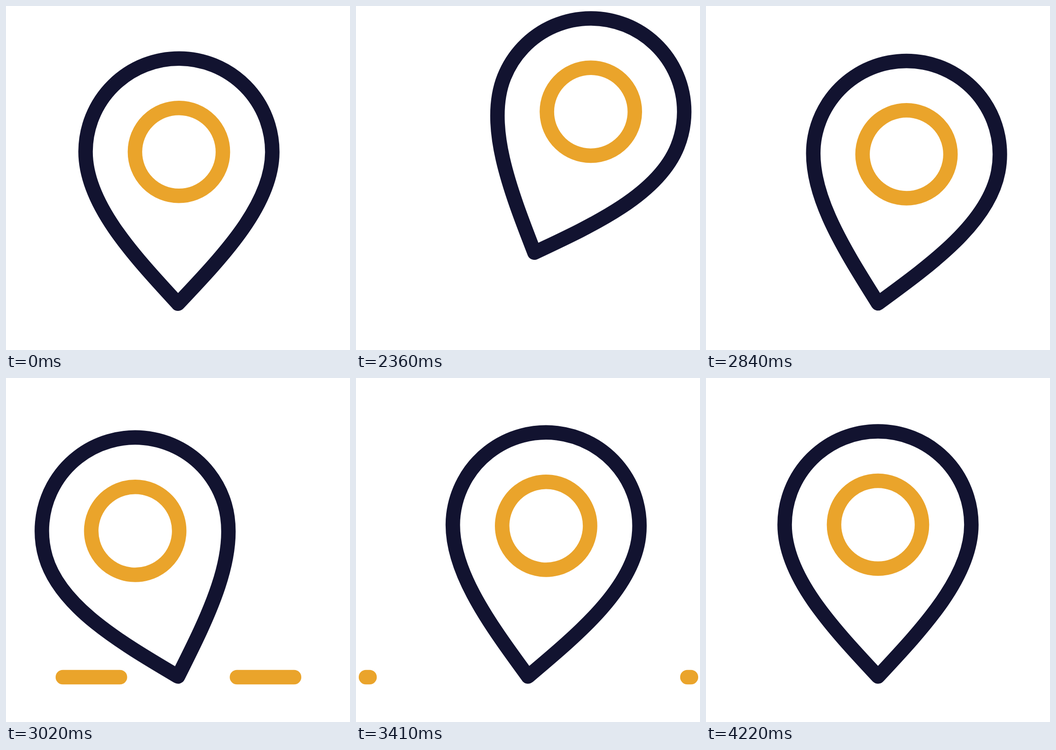
Animation of 748x748 px, one loop 4250 ms. Source, as an HTML page:

```html
<!DOCTYPE html>
<html lang="en">
<head>
<meta charset="utf-8">
<title>Jumping map pin</title>
<style>
  html, body { margin: 0; height: 100%; overflow: hidden; background: #fff; }
  svg { display: block; width: 100%; height: 100%; }
  svg * { fill: none; stroke-width: 31.5; stroke-linecap: round; stroke-linejoin: round; }
  .navy { stroke: #121330; }
  .amber { stroke: #eaa42b; }
</style>
</head>
<body>
<svg viewBox="0 0 748 748">
  <path id="dashes" class="amber"/>
  <g id="pin">
    <path class="navy" d="M0 0C-99.6 -106.7 -203 -217 -203 -330A203 203 0 0 1 203 -330C203 -217 99.6 -106.7 0 0Z"/>
    <circle class="amber" cy="-330" r="95.6"/>
  </g>
</svg>
<script>
  const LOOP = 4250, HOLD = 2000, STEP = 30;
  const pin = document.getElementById('pin');
  const dashes = document.getElementById('dashes');

  // Keys: [step, value, ease out of this key, ease into the next key]
  const LIFT = [[0.4, 0, 0.14, 0.2], [21.4, 1, 0.6, 0.48], [30, 0]];
  const TILT = [
    [0.4, 0, 0.14, 0.2], [21.4, 24.4, 0.62, 0.66], [36.5, -17.7, 1 / 3, 2 / 3],
    [51.4, 10.6, 1 / 3, 2 / 3], [63, -4.1, 1 / 3, 2 / 3], [75, 0],
  ];

  // Cubic bezier easing through (x1, 0) and (x2, 1), solved by bisection
  function ease(u, x1, x2) {
    let low = 0, high = 1, s;
    for (let i = 0; i < 30; i++) {
      s = (low + high) / 2;
      const x = 3 * x1 * s * (1 - s) ** 2 + 3 * x2 * s * s * (1 - s) + s ** 3;
      if (x < u) low = s; else high = s;
    }
    return s * s * (3 - 2 * s);
  }

  function valueAt(keys, step) {
    if (step <= keys[0][0]) return keys[0][1];
    for (let i = 1; i < keys.length; i++) {
      const [start, from, x1, x2] = keys[i - 1];
      const [end, to] = keys[i];
      if (step < end) return from + (to - from) * ease((step - start) / (end - start), x1, x2);
    }
    return keys[keys.length - 1][1];
  }

  function easeOut(step, start, end, power) {
    const u = Math.min(1, Math.max(0, (step - start) / (end - start)));
    return 1 - (1 - u) ** power;
  }

  function draw(time) {
    const step = 1 + Math.max(0, Math.floor((time - HOLD) / STEP));
    const lift = valueAt(LIFT, step);
    // The tip drifts right along a curve as it rises
    pin.setAttribute('transform',
      `translate(${374 + 16.5 * lift ** 1.5} ${649 - 126 * lift}) rotate(${valueAt(TILT, step)})`);

    const head = 353.5 * easeOut(step, 29, 51, 3.9);
    const tail = 353.5 * easeOut(step, 31, 51, 2);
    dashes.setAttribute('d', step > 29 && step < 51
      ? `M${375 - tail} 650.5H${375 - head}M${375 + tail} 650.5H${375 + head}` : '');
  }

  const origin = performance.now();
  function tick() {
    draw((performance.now() - origin) % LOOP);
    requestAnimationFrame(tick);
  }
  tick();
</script>
</body>
</html>
```
